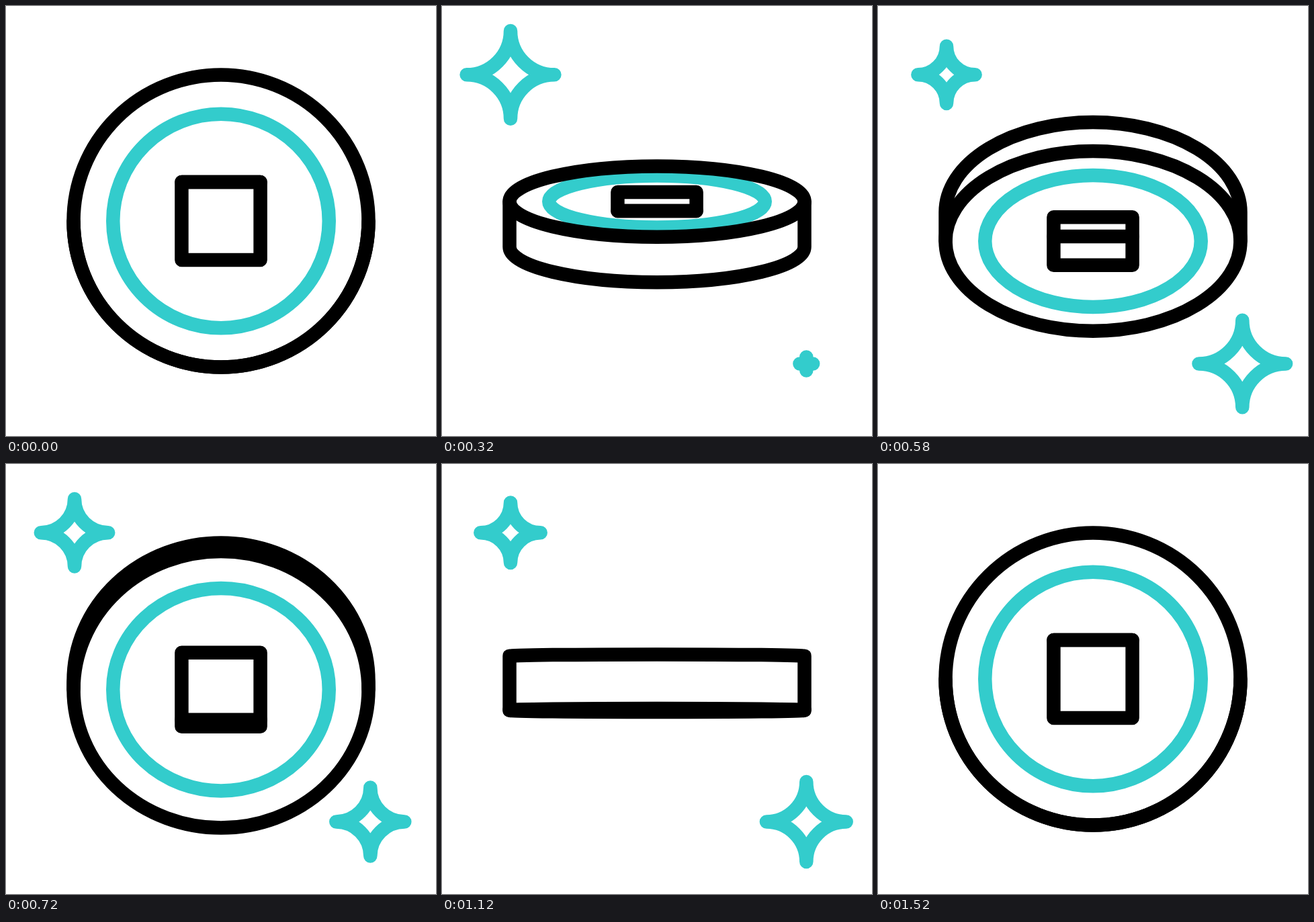
Write an HTML page with a canvas that moves like this. It is 640 by 640 pixels and loops after 1900 ms.

```html
<!DOCTYPE html>
<html lang="en">
<head>
<meta charset="utf-8">
<title>Spinning coin</title>
<style>
  html, body { margin: 0; width: 100%; height: 100%; overflow: hidden; background: #fff; }
  canvas { display: block; width: 100vw; height: 100vh; }
</style>
</head>
<body>
<canvas id="stage" width="640" height="640"></canvas>
<script>
const ctx = document.getElementById('stage').getContext('2d');
const LOOP = 1900, MOTION_END = 1520, STEP = 20;
const BLACK = '#000', TEAL = '#33cccc';
const CX = 320, RADIUS = 219.5, RING = 160.75, HOLE = 58.6, EDGE = 81.3;

// Keys are [time, value]; the turn counts quarter turns.
const turn = [[0, 0], [200, .546], [440, 1.114], [720, 1.846], [960, 2.556], [1280, 3.438], [1520, 4]];
const height = [[0, 320], [200, 322.9], [440, 326.6], [720, 329.5], [960, 328], [1280, 324], [1520, 320]];
const sparkles = [
  { x: 102, y: 102.3, size: [[0, 0], [200, 41.3], [305, 67], [440, 52.6], [550, 41], [720, 50.2], [1000, 67], [1080, 57.5], [1260, 0]] },
  { x: 542.3, y: 532.5, size: [[270, 0], [440, 33.6], [555, 67.3], [720, 51], [810, 41.5], [960, 50.2], [1257, 67.3], [1340, 57.5], [1520, 0]] }
];

function segment(keys, t) {
  let i = 0;
  while (i < keys.length - 2 && t >= keys[i + 1][0]) i++;
  return i;
}

function linear(keys, t) {
  const i = segment(keys, t), [t0, v0] = keys[i], [t1, v1] = keys[i + 1];
  const u = Math.min(1, Math.max(0, (t - t0) / (t1 - t0)));
  return v0 + (v1 - v0) * u;
}

function smooth(keys, t) {
  const i = segment(keys, t), [t0, v0] = keys[i], [t1, v1] = keys[i + 1];
  const slope = k => {
    const a = keys[Math.max(0, k - 1)], b = keys[Math.min(keys.length - 1, k + 1)];
    return (b[1] - a[1]) / (b[0] - a[0]);
  };
  const d = t1 - t0, u = (t - t0) / d, w = 1 - u;
  return v0 * (1 + 2 * u) * w * w + slope(i) * d * u * w * w
       + v1 * u * u * (3 - 2 * u) - slope(i + 1) * d * u * u * w;
}

function stroke(color, trace) {
  ctx.strokeStyle = color;
  ctx.beginPath();
  trace();
  ctx.stroke();
}

function drawCoin(t) {
  const phase = smooth(turn, t) % 2;
  const facingUp = phase < 1;
  const tilt = facingUp ? phase : 2 - phase;
  const depth = EDGE * tilt;
  const ratio = Math.min(.991, Math.max(0, 1 - Math.pow(tilt, 1.48)));
  const side = facingUp ? 1 : -1;
  const mid = smooth(height, t);
  const front = mid - side * depth / 2, back = mid + side * depth / 2;
  const ry = RADIUS * ratio;

  // Square hole and the far edge of its inner wall
  const half = HOLE * ratio;
  stroke(BLACK, () => ctx.rect(CX - HOLE, front - half, HOLE * 2, half * 2));
  const wall = Math.min(half * 2, depth * (facingUp ? .915 : .7 + .55 * tilt));
  const wallY = front + side * (wall - half);
  stroke(BLACK, () => {
    ctx.moveTo(CX - HOLE, wallY);
    ctx.lineTo(CX + HOLE, wallY);
  });

  stroke(TEAL, () => ctx.ellipse(CX, front, RING, RING * ratio, 0, 0, Math.PI * 2));

  // Rim and face outline
  stroke(BLACK, () => {
    ctx.moveTo(CX - RADIUS, front);
    ctx.lineTo(CX - RADIUS, back);
    ctx.ellipse(CX, back, RADIUS, ry, 0, Math.PI, 0, facingUp);
    ctx.lineTo(CX + RADIUS, front);
  });
  stroke(BLACK, () => ctx.ellipse(CX, front, RADIUS, ry, 0, 0, Math.PI * 2));
}

function drawSparkle({ x, y, size }, t) {
  const r = linear(size, t);
  if (r <= 0) return;
  const q = Math.PI / 2;
  stroke(TEAL, () => {
    ctx.arc(x + r, y - r, r, 2 * q, q, true);
    ctx.arc(x + r, y + r, r, 3 * q, 2 * q, true);
    ctx.arc(x - r, y + r, r, 0, -q, true);
    ctx.arc(x - r, y - r, r, q, 0, true);
    ctx.closePath();
  });
}

function draw(now) {
  const t = Math.min(MOTION_END, Math.floor((now % LOOP) / STEP) * STEP);
  ctx.fillStyle = '#fff';
  ctx.fillRect(0, 0, 640, 640);
  ctx.lineWidth = 20.5;
  ctx.lineJoin = ctx.lineCap = 'round';
  drawCoin(t);
  sparkles.forEach(s => drawSparkle(s, t));
}

let start;
function tick(now) {
  start ??= now;
  draw(now - start);
  requestAnimationFrame(tick);
}
draw(0);
requestAnimationFrame(tick);
</script>
</body>
</html>
```
